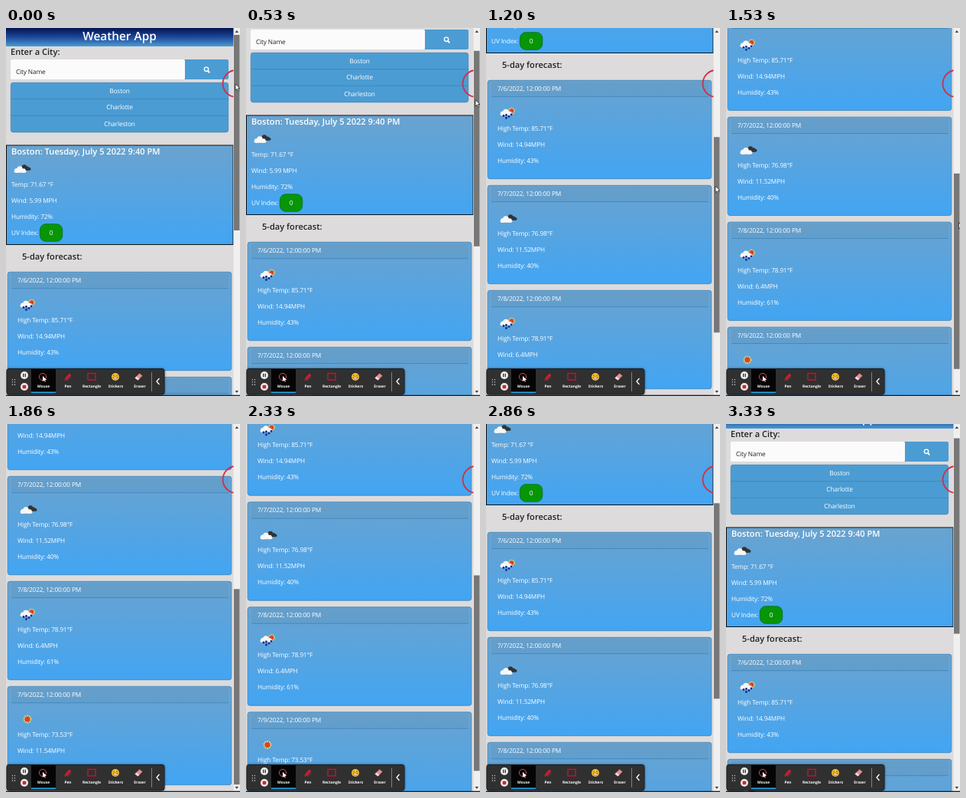
An HTML page that plays this animation: 306 by 480 pixels, repeating every 3.4 s.

```html
<!DOCTYPE html>
<html lang="en">
<head>
<meta charset="utf-8">
<title>Weather App</title>
<style>
  html, body { margin: 0; width: 100%; height: 100%; overflow: hidden; background: #dddbdc; }
  svg { display: block; width: 306px; height: 480px; }
  text {
    font: 8.3px "Open Sans", "Noto Sans", sans-serif; letter-spacing: -.15px;
    fill: #fff; white-space: pre; text-rendering: geometricPrecision;
  }
  .head { font-size: 11.1px; font-weight: 600; letter-spacing: 0; }
  .dark { fill: #222; }
  .tool { font-size: 4.9px; font-weight: 700; letter-spacing: 0; }
  .mid { text-anchor: middle; }
  #toolbar { filter: drop-shadow(0 0 1.5px #0008); }
</style>
</head>
<body>
<svg viewBox="0 0 306 480">
  <defs>
    <linearGradient id="navy" x2="0" y2="1">
      <stop stop-color="#03134f"/><stop offset=".5" stop-color="#1d489a"/><stop offset="1" stop-color="#4b9cd3"/>
    </linearGradient>
    <linearGradient id="sky" x2="0" y2="1">
      <stop stop-color="#6aa3cf"/><stop offset="1" stop-color="#42a5f3"/>
    </linearGradient>
    <g id="whiteCloud" fill="#f7f7f7">
      <circle cx="-6" cy="3" r="3"/><circle cx="-2" cy="1" r="3.8"/><circle cx="3" cy="3" r="2.7"/>
      <rect x="-9.5" y="2.2" width="16" height="3.6" rx="1.8"/>
    </g>
    <g id="clouds">
      <g fill="#333"><circle cx="4" cy="-1.5" r="3.2"/><circle cx="8" cy="0" r="2.5"/><rect x="1" y="-1" width="11.5" height="3.8" rx="1.9"/></g>
      <use href="#whiteCloud"/>
    </g>
    <g id="sun">
      <circle r="4.3" fill="none" stroke="#f8d34a" stroke-width="2.2" stroke-dasharray="1.7 1"/>
      <circle r="3.5" fill="#e2401f"/>
    </g>
    <g id="rain">
      <use href="#sun" transform="translate(5.5 -3) scale(.8)"/>
      <use href="#whiteCloud" y="-2.5"/>
      <path d="M-5 3.5h0M-1.5 2.5h0M-1.5 6.5h0M2 4.5h0M5 2h0" stroke="#17288c" stroke-width="2.9" stroke-linecap="round"/>
    </g>
  </defs>

  <rect width="306" height="480" fill="#dddbdc"/>
  <g id="page"></g>
  <circle cx="301" cy="72.5" r="17.5" fill="none" stroke="#cf3045" stroke-width="1.8"/>

  <rect x="297.5" width="8.5" height="480" fill="#f0f0f0"/>
  <path d="M299.5 6l2.3-3 2.3 3zM299.5 473l2.3 3 2.3-3z" fill="#444"/>
  <rect id="thumb" x="298" y="9" width="7.5" height="255" fill="#777"/>
  <path id="cursor" d="M0 0v8.2l2-1.8 1.4 3 1.4-.7-1.4-2.9h2.5z" fill="#fff" stroke="#111" stroke-width=".7"/>

  <rect y="478.7" width="306" height="1.3" fill="#222"/>
  <g id="toolbar">
    <rect x="1" y="444.5" width="206" height="33.5" rx="3" fill="#303031" stroke="#1c1c1c"/>
    <path d="M8.5 458v8M11.5 458v8" stroke="#bbb" stroke-width="1.3" stroke-dasharray="1.3 2"/>
    <circle cx="24" cy="453" r="5" fill="#eee"/>
    <path d="M22.7 450.7v4.6M25.3 450.7v4.6" stroke="#333" stroke-width="1.3"/>
    <circle cx="24" cy="468" r="5" fill="#eee"/>
    <rect x="21.7" y="465.7" width="4.6" height="4.6" rx=".6" fill="#d8222f"/>
    <rect x="33" y="445" width="32" height="31" fill="#050505"/>
    <rect x="33" y="474.5" width="32" height="1.6" fill="#28a5e6"/>
    <circle cx="48" cy="455" r="4.6" fill="none" stroke="#e0475a" stroke-width="1"/>
    <path d="M48 454v7l1.8-1.5 1.1 2 1-.6-1-2h2.2z" fill="#fff"/>
    <path d="M77 459.5l1-3.3 5-5.2 2 2-5 5.2zM80 460l5-5" fill="#d31b2c" stroke="#d31b2c" stroke-width=".9"/>
    <rect x="107" y="450.5" width="10" height="8.5" fill="none" stroke="#c5142b" stroke-width="1.4"/>
    <circle cx="143" cy="455" r="5" fill="#f7bf2d"/>
    <path d="M139.8 455.5a3.3 3.3 0 0 0 6.4 0z" fill="#fff" stroke="#6b3d10" stroke-width=".6"/>
    <path d="M141 452.5v1.5M145 452.5v1.5" stroke="#6b3d10"/>
    <path d="M168.5 456.5l6-6 4 3-6 6z" fill="#e58b94"/>
    <path d="M168.5 456.5l2-2 4 3-2 2z" fill="#f6d7d9"/>
    <path d="M190.5 449v25" stroke="#999" stroke-width=".8"/>
    <path d="M200.5 457l-3.5 4 3.5 4" fill="none" stroke="#fff" stroke-width="1.3"/>
  </g>
</svg>
<script>
const $ = id => document.getElementById(id);
const text = (x, y, s, cls = '') => `<text x="${x}" y="${y}" class="${cls}">${s}</text>`;
const rect = (x, y, w, h, attrs) => `<rect x="${x}" y="${y}" width="${w}" height="${h}" ${attrs}/>`;
const line = (x1, x2, y) => `<path d="M${x1} ${y}H${x2}" stroke="#3c83b8" stroke-width=".8"/>`;
const icon = (name, x, y) => `<use href="#${name}" x="${x}" y="${y}"/>`;

const cities = ['Boston', 'Charlotte', 'Charleston'];
const forecast = [
  ['7/6/2022', 'rain', '85.71', '14.94', 43],
  ['7/7/2022', 'clouds', '76.98', '11.52', 40],
  ['7/8/2022', 'rain', '78.91', '6.4', 61],
  ['7/9/2022', 'sun', '73.53', '11.54', 55],
];

function card([date, sky, temp, wind, humidity], i) {
  const y = 318 + 137 * i;
  return rect(2.2, y + .3, 292.6, 128.4, 'rx="3" fill="url(#sky)" stroke="#3c83b8" stroke-width=".8"')
    + rect(7, y + 2, 284, 19.5, 'fill="#000" opacity=".03"')
    + line(7, 291, y + 21.7)
    + text(15, y + 14, `${date}, 12:00:00 PM`)
    + icon(sky, 28, y + 43)
    + text(15, y + 66, `High Temp: ${temp}°F`)
    + text(15, y + 87, `Wind: ${wind}MPH`)
    + text(15, y + 108, `Humidity: ${humidity}%`);
}

$('page').innerHTML =
  rect(0, 0, 298, 24, 'fill="url(#navy)"')
  + `<text x="148.5" y="16" class="mid" style="font-size:15.4px;font-weight:600;letter-spacing:0">Weather App</text>`
  + text(6, 35, 'Enter a City:', 'head dark')
  + rect(230, 41, 61, 26, 'rx="2" fill="#4b9cd3"')
  + rect(6, 41, 228, 26, 'rx="1.5" fill="#fbfbfb"')
  + text(13, 59.7, 'City Name', 'dark')
  + '<path d="M264 56l2.3 2.3" stroke="#fff" stroke-width="1.8"/>'
  + '<circle cx="262" cy="53.8" r="2.7" fill="none" stroke="#fff" stroke-width="1.4"/>'
  + rect(6.3, 71.3, 284.4, 64.6, 'rx="3" fill="#4b9cd3" stroke="#3c83b8" stroke-width=".7"')
  + line(6, 291, 92.7) + line(6, 291, 114.3)
  + cities.map((city, i) => text(148.5, 84.7 + 21.5 * i, city, 'mid')).join('')
  + rect(.5, 153, 296.5, 129.5, 'fill="url(#sky)" stroke="#111" stroke-width="1"')
  + text(7, 164.6, 'Boston: Tuesday, July 5 2022 9:40 PM', 'head')
  + icon('clouds', 20, 183)
  + text(7, 207, 'Temp: 71.67 °F')
  + text(7, 228, 'Wind: 5.99 MPH')
  + text(7, 249, 'Humidity: 72%')
  + text(7, 270, 'UV Index:')
  + rect(44.4, 255.7, 29.4, 22.6, 'rx="7.5" fill="#069606" stroke="#0a6e2a" stroke-width=".8"')
  + text(59, 270, '0', 'mid')
  + text(21, 302, '5-day forecast:', 'head dark')
  + forecast.map(card).join('');

const tools = { Mouse: 49, Pen: 81, Rectangle: 112, Stickers: 143.5, Eraser: 175 };
$('toolbar').insertAdjacentHTML('beforeend',
  Object.entries(tools).map(([name, x]) => text(x, 469.3, name, 'mid tool')).join(''));

// Scroll offset over time, joined by a monotone cubic curve
const LOOP = 3400, STEPS = 51;
const keys = [[0, 0], [530, 39], [1200, 250], [1860, 387], [1990, 387],
  [2600, 298], [2860, 177], [3330, 18], [LOOP, 6]];
const secant = i => (keys[i + 1][1] - keys[i][1]) / (keys[i + 1][0] - keys[i][0]);
const slopes = keys.map((_, i) => {
  if (i === 0) return secant(0);
  if (i === keys.length - 1) return secant(i - 1);
  const a = secant(i - 1), b = secant(i);
  return a * b > 0 ? 2 * a * b / (a + b) : 0;
});

function scrollAt(t) {
  let i = 0;
  while (i < keys.length - 2 && t >= keys[i + 1][0]) i++;
  const [t0, y0] = keys[i], [t1, y1] = keys[i + 1];
  const h = t1 - t0, u = (t - t0) / h, v = 1 - u;
  return y0 * (1 + 2 * u) * v * v + y1 * u * u * (3 - 2 * u)
    + h * u * v * (slopes[i] * v - slopes[i + 1] * u);
}

const stepTime = t => {
  const step = Math.floor((t + 7) * STEPS / LOOP) % STEPS;
  return Math.floor(step * LOOP / STEPS / 10) * 10;
};

function draw(now) {
  const t = stepTime(now % LOOP);
  const y = scrollAt(t);
  const slide = Math.min(1, Math.max(0, (t - 1250) / 500));
  $('page').setAttribute('transform', `translate(0 ${-y})`);
  $('thumb').setAttribute('y', 9 + y * .533);
  $('cursor').setAttribute('transform', `translate(${300 + 8 * slide} ${73 + y * .533})`);
  requestAnimationFrame(() => draw(performance.now() - start));
}
const start = performance.now();
draw(0);
</script>
</body>
</html>
```
